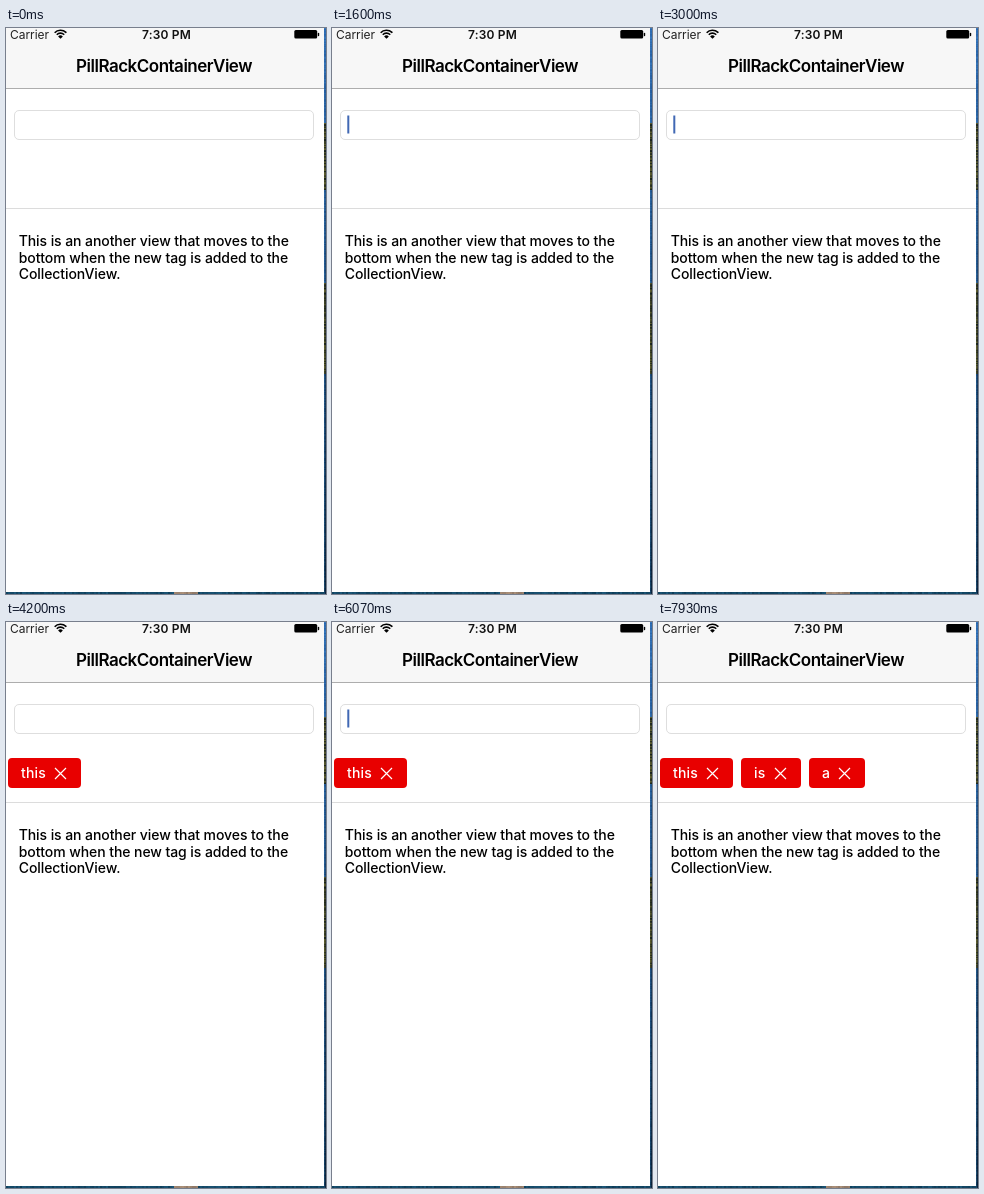
Recreate the animation shown at these times as an HTML page with a canvas. Size 320 by 566 pixels, loop 8 s.

```html
<!DOCTYPE html>
<html lang="en">
<head>
<meta charset="utf-8">
<title>Tag entry</title>
<style>
  html, body { margin: 0; width: 100%; height: 100%; overflow: hidden; background: #fff; }
  canvas { display: block; width: 320px; height: 566px; }
</style>
</head>
<body>
<canvas id="stage"></canvas>
<script>
const W = 320, H = 566, LOOP = 8000, BLINK = 1066.7;
const FONT = 'Inter, Roboto, sans-serif';
const TITLE = 'PillRackContainerView';
const NOTE = [
  'This is an another view that moves to the',
  'bottom when the new tag is added to the',
  'CollectionView.'
];

// Moments at which the field's text changes.
const TYPING = [
  [0, ''], [3270, 't'], [3400, 'th'], [3470, 'thi'], [3600, 'this'], [3870, ''],
  [6200, 'i'], [6330, 'is'], [6530, ''], [6765, 'a'], [7600, '']
];
const TAGS = [
  { text: 'this', x: 2, w: 73, at: 3870 },
  { text: 'is', x: 83, w: 60, at: 6530 },
  { text: 'a', x: 151, w: 56, at: 7600 }
];

const canvas = document.getElementById('stage');
const ctx = canvas.getContext('2d');
const ratio = window.devicePixelRatio || 1;
canvas.width = W * ratio;
canvas.height = H * ratio;

function rect(x, y, w, h, color) {
  ctx.fillStyle = color;
  ctx.fillRect(x, y, w, h);
}

function roundPath(x, y, w, h, r) {
  ctx.beginPath();
  ctx.roundRect(x, y, w, h, r);
}

function label(text, x, y, size, { weight = 400, color = '#000', align = 'left', spacing = 0 } = {}) {
  ctx.font = `${weight} ${size}px ${FONT}`;
  ctx.letterSpacing = spacing + 'px';
  ctx.textAlign = align;
  ctx.fillStyle = color;
  ctx.fillText(text, x, y);
}

function random(seed) {
  const v = Math.sin(seed * 12.9898) * 43758.5453;
  return v - Math.floor(v);
}

// Sliver of desktop visible past the right and bottom edges of the window.
function drawDesktop() {
  for (let y = 0; y < H; y++) {
    const n = random(y + 1);
    const leafy = (y > 94 && y < 162) || (y > 254 && y < 346);
    const fade = y / H;
    const color = leafy
      ? `rgb(${25 + n * 75}, ${35 + n * 65}, ${30 + n * 20})`
      : `rgb(${40 - fade * 25 + n * 15}, ${100 - fade * 45 + n * 20}, ${170 - fade * 80 + n * 20})`;
    rect(318, y, 2, 1, color);
    rect(319, y, 1, 1, `rgba(0, 8, 20, ${fade * 0.5})`);
  }
  for (let x = 0; x < 318; x += 2) {
    const n = random(x + 900);
    const sandy = x > 166 && x < 192;
    rect(x, 564, 2, 2, sandy
      ? `rgb(${140 + n * 30}, ${118 + n * 25}, ${100 + n * 20})`
      : `rgb(${12 + n * 15}, ${60 + n * 25}, ${88 + n * 30})`);
  }
}

function drawWifi() {
  ctx.strokeStyle = '#000';
  ctx.lineWidth = 1.6;
  for (const r of [8, 5.1]) {
    ctx.beginPath();
    ctx.arc(54.5, 10.2, r, -Math.PI * 0.76, -Math.PI * 0.24);
    ctx.stroke();
  }
  ctx.fillStyle = '#000';
  ctx.beginPath();
  ctx.moveTo(54.5, 10.8);
  ctx.arc(54.5, 10.8, 3.3, -Math.PI * 0.76, -Math.PI * 0.24);
  ctx.fill();
}

function drawBattery() {
  ctx.fillStyle = '#000';
  roundPath(288.3, 2, 22.9, 8.6, 1.5);
  ctx.fill();
  roundPath(311.8, 4.8, 1.4, 3.4, 0.7);
  ctx.fill();
}

function drawHeader() {
  rect(0, 0, 318, 60, '#f7f7f7');
  rect(0, 60, 318, 1, '#adadad');
  label('Carrier', 4, 10.5, 12, { color: '#222', spacing: -0.05 });
  drawWifi();
  label('7:30 PM', 160.5, 10.5, 12, { weight: 600, align: 'center', color: '#111', spacing: 0.2 });
  drawBattery();
  label(TITLE, 158, 44, 17, { weight: 600, align: 'center', spacing: -0.5 });
}

function caretLevel(phase) {
  const p = phase % BLINK;
  if (p < 133) return 0;
  if (p < 500) return Math.pow((p - 133) / 367, 1.6);
  return Math.min(1, Math.max(0, (BLINK - p - 138) / 55));
}

function drawField(t) {
  ctx.strokeStyle = '#dedede';
  ctx.lineWidth = 1;
  roundPath(8.5, 82.5, 299, 29, 4.5);
  ctx.stroke();

  const [since, text] = TYPING.filter(([at]) => at <= t).pop();
  label(text, 14.5, 102, 14);
  // Every edit restarts the blink with the caret lit.
  const level = caretLevel(since ? t - since + 667 : t);
  if (text) {
    rect(14.5 + ctx.measureText(text).width - 1, 88, 1, 17, `rgba(75, 80, 150, ${level})`);
  } else if (level > 0) {
    const tint = level < 0.5 ? '150, 150, 155' : '65, 104, 180';
    const alpha = level < 0.5 ? 0.2 + level : level;
    rect(15.3, 87.5, 2, 18, `rgba(${tint}, ${alpha})`);
  }
}

function drawTag({ text, x, w }) {
  ctx.fillStyle = '#e80000';
  roundPath(x, 136, w, 30, 4);
  ctx.fill();
  label(text, x + 13, 156, 14, { color: '#fff', weight: 500, spacing: 0.15 });
  const cx = x + w - 20.5, cy = 151.5, r = 5.5;
  ctx.strokeStyle = '#fff';
  ctx.lineWidth = 1.2;
  ctx.beginPath();
  ctx.moveTo(cx - r, cy - r);
  ctx.lineTo(cx + r, cy + r);
  ctx.moveTo(cx + r, cy - r);
  ctx.lineTo(cx - r, cy + r);
  ctx.stroke();
}

function draw(t) {
  ctx.setTransform(ratio, 0, 0, ratio, 0, 0);
  rect(0, 0, W, H, '#fff');
  drawDesktop();
  drawHeader();
  drawField(t);
  TAGS.filter(tag => t >= tag.at).forEach(drawTag);
  rect(0, 180, 318, 1, '#dcdcdc');
  NOTE.forEach((line, i) => label(line, 12.7, 218 + i * 16.7, 14, { weight: 500, spacing: -0.08 }));
}

const start = performance.now();
function tick() {
  draw((performance.now() - start) % LOOP);
  requestAnimationFrame(tick);
}
tick();
</script>
</body>
</html>
```
